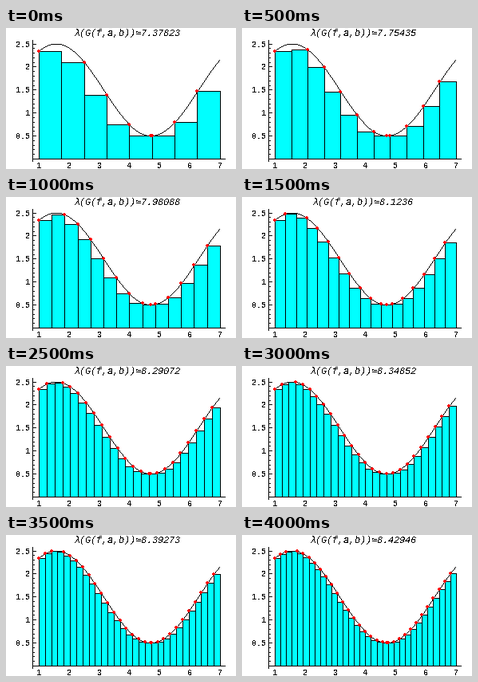
A matplotlib script that plays this animation: 288 px wide and 177 px high, repeating every 4500 ms.

```python
import numpy as np
import matplotlib.pyplot as plt
from matplotlib.animation import FuncAnimation
from matplotlib.collections import PolyCollection

W, H, DPI = 288, 177, 72
A, B = 1, 7
LOW = 1.5 * np.pi  # where f is smallest

# Outlines of a single pixel and of a small round dot
PIXEL = np.array([(0, 0), (1, 0), (1, 1), (0, 1)])
DOT = np.array([(-1, -2), (1, -2), (1, -1), (2, -1), (2, 1), (1, 1),
                (1, 2), (-1, 2), (-1, 1), (-2, 1), (-2, -1), (-1, -1)])

plt.rcParams.update({
    "toolbar": "None",
    "text.antialiased": False,
    "text.hinting": "native",
    "text.hinting_factor": 1,
    "font.family": ["Liberation Mono", "DejaVu Sans Mono"],
})


def f(x):
    return 1.5 + np.sin(x)


def px(x):
    return 41.5 + (np.asarray(x) - A) * 37.8


def py(y):
    return 164.5 - np.asarray(y) * 57.8


def snap(v):
    return np.floor(v) + 0.5


def stamp(shape, xs, ys):
    """Copies of a shape, each moved to a whole pixel."""
    return [shape + np.floor(p) for p in zip(xs, ys)]


fig = plt.figure(figsize=(W / DPI, H / DPI), dpi=DPI, facecolor="white")
ax = fig.add_axes([0, 0, 1, 1])
ax.set_xlim(0, W)
ax.set_ylim(H, 0)
ax.axis("off")


def line(xs, ys):
    ax.plot(xs, ys, color="black", lw=1, antialiased=False, snap=False,
            zorder=1, solid_capstyle="butt")


def polys(z, face, edge="none", lw=0, verts=()):
    group = PolyCollection(verts, facecolors=face, edgecolors=edge,
                           linewidths=lw, antialiaseds=False, zorder=z)
    group.set_snap(False)
    ax.add_collection(group, autolim=False)
    return group


# Axes with major and minor ticks
x0, y0 = float(snap(px(0.8))), float(snap(py(0)))
line([x0, 275], [y0, y0])
line([x0, x0], [15, 168])
for i in range(26):
    y = float(snap(py(i / 10)))
    line([x0, x0 + (4.5 if i % 5 == 0 else 2.5)], [y, y])
    if i and i % 5 == 0:
        ax.text(30, y - 0.5, f"{i / 10:g}", size=10, ha="right",
                va="center_baseline")
for i in range(4, 36):
    x = float(snap(px(i / 5)))
    line([x, x], [y0, y0 - (4.5 if i % 5 == 0 else 2.5)])
    if i % 5 == 0:
        ax.text(x, 176, str(i // 5), size=10, ha="center", va="baseline")

# Curve one pixel wide: equal steps along its steeper direction
t = np.linspace(A, B, 4000)
cx, cy = px(t), py(f(t))
way = np.cumsum(np.maximum(np.abs(np.diff(cx, prepend=cx[0])),
                           np.abs(np.diff(cy, prepend=cy[0]))))
steps = np.arange(0, way[-1], 1)
polys(3, "black", verts=stamp(PIXEL, np.interp(steps, way, cx),
                              np.interp(steps, way, cy)))

bars = polys(2, "cyan", "black", 1)
dots = polys(4, "red")
title = ax.text(152, 10, "", size=12, style="italic", ha="center",
                va="baseline")


def draw(k):
    n = 8 + 3 * k
    edges = np.linspace(A, B, n + 1)
    left, right = edges[:-1], edges[1:]
    total = np.minimum(f(left), f(right)).sum() * (B - A) / n
    spot = np.where(f(left) < f(right), left, right)
    spot = np.where((left < LOW) & (LOW < right), LOW, spot)

    tops = snap(py(f(spot)))
    xs = snap(px(edges))
    bars.set_verts([[(a, y0), (a, top), (b, top), (b, y0)]
                    for a, b, top in zip(xs[:-1], xs[1:], tops)])
    dots.set_verts(stamp(DOT, px(spot), py(f(spot))))
    title.set_text(f"λ(G(f,a,b))≃{total:.6g}")
    return bars, dots, title


anim = FuncAnimation(fig, draw, frames=9, interval=500, repeat=True,
                     repeat_delay=0, blit=False)
plt.show()
```
